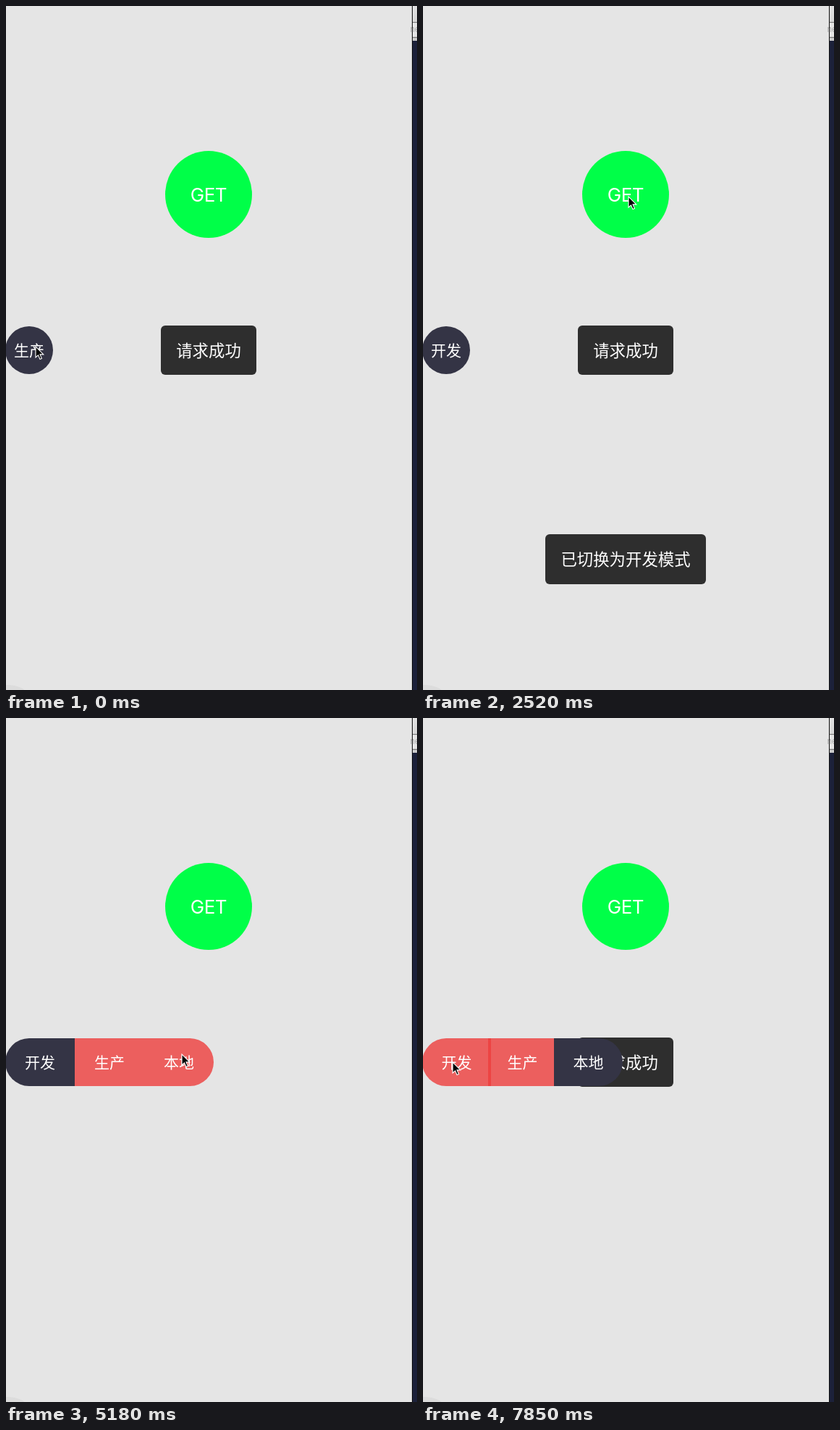
An HTML page for the animation above (8 s loop, 568x944 px).

```html
<!DOCTYPE html>
<html lang="zh-CN">
<head>
<meta charset="utf-8">
<title>环境切换</title>
<style>
  html, body { margin: 0; width: 100%; height: 100%; overflow: hidden; background: #e5e5e5; }
  svg { display: block; width: 568px; height: 944px; }
  text { fill: #fff; text-anchor: middle; font-family: "Noto Sans CJK SC", "Noto Sans CJK", sans-serif; font-weight: 350; }
  .get { font: 26px Inter, sans-serif; letter-spacing: -.5px; }
  .toast { font-size: 22.4px; }
  .toast rect { fill: #000; fill-opacity: .8; }
  .item { font-size: 21px; }
  .item rect { fill: #ee3e3c; fill-opacity: .8; }
  .item.on rect { fill: #343445; fill-opacity: 1; }
</style>
</head>
<body>
<svg viewBox="0 0 568 944">
  <defs>
    <clipPath id="clip"><rect id="pill" x="-1" y="442" height="66" rx="33"/></clipPath>
    <linearGradient id="bar" x2="0" y2="1">
      <stop stop-color="#e2e2e2"/><stop offset="1" stop-color="#cbcbcb"/>
    </linearGradient>
  </defs>
  <rect width="568" height="944" fill="#e5e5e5"/>
  <circle cx="3" cy="978" r="41" fill="#dcdcdc"/>

  <!-- window behind, at the right edge -->
  <rect x="562" width="6" height="944" fill="#1c213a"/>
  <rect x="562" width="6" height="48" fill="url(#bar)"/>
  <path d="M562 22.5h6M562 43.5h6" stroke="#777"/>
  <rect x="562" y="24" width="6" height="18" fill="#e6e6e6"/>
  <text x="565" y="36" style="font:11px Inter,sans-serif;fill:#aaa">ne</text>
  <rect x="561" width="1" height="944" fill="#111"/>

  <circle cx="280" cy="260" r="60" fill="#00ff48"/>
  <text class="get" x="280" y="269.5">GET</text>

  <g id="spin" fill="none" stroke="#ee3e3c" stroke-width="4.5"></g>
  <g id="done" class="toast">
    <rect x="214" y="441" width="132" height="68" rx="6"/>
    <text x="280" y="483.5">请求成功</text>
  </g>
  <g id="mode" class="toast">
    <rect x="169" y="729" width="222" height="69" rx="6"/>
    <text x="280" y="772"></text>
  </g>
  <g id="items" clip-path="url(#clip)"></g>
  <path id="cursor" d="M0 0V15L3.5 11.9 6 17.5 8.4 16.4 6 10.9H10.8Z" stroke="#fff" stroke-width="1.1"/>
</svg>
<script>
const LOOP = 8000, TICKS = 54, TICK = LOOP / TICKS;
const NAMES = ['开发', '生产', '本地'];
const $ = id => document.getElementById(id);

function add(parent, tag, attrs) {
  const el = document.createElementNS('http://www.w3.org/2000/svg', tag);
  set(el, attrs);
  return parent.appendChild(el);
}
function set(el, attrs) {
  for (const key in attrs) el.setAttribute(key, attrs[key]);
}

const ramp = (k, from, span) => Math.min(1, Math.max(0, (k - from) / span));
const smooth = x => x * x * (3 - 2 * x);
// Rises at one tick and falls at another.
const pulse = (k, on, off, span) => ramp(k, on, span) - ramp(k, off, span);

// All times in ticks.
const PICK_1 = 5.4, PICK_2 = 36.4, TOAST_LIFE = 14.6;

const menu = k => smooth(pulse(k, 1, PICK_1 + .36, 2) + pulse(k, 23, PICK_2 + .36, 2) + ramp(k, 51.27, 2));
const doneToast = k => 1 - ramp(k, PICK_1, 2) + pulse(k, 9.6, 28, 2) + ramp(k, 40.6, 2);
const modeToast = k => pulse(k, PICK_1, PICK_1 + TOAST_LIFE, 2) + pulse(k, PICK_2, PICK_2 + TOAST_LIFE, 2);
const loading = k => pulse(k, 9, 10.6, 1) + pulse(k, 13, 15.6, 1) + pulse(k, 40, 41.4, 1);

// Cursor trips: leave, arrive, x, y.
const TRIPS = [
  [5, 6, 44, 475], [7, 10, 280, 252], [13, 17, 284, 263], [19, 22, 18, 484],
  [23, 30, 240, 347], [30, 35, 243, 464], [37, 42, 272, 253], [44, 51, 41, 475]
];
function cursor(k) {
  return TRIPS.reduce(([x, y], [leave, arrive, toX, toY]) => {
    const f = smooth(ramp(k, leave, arrive - leave));
    return [x + (toX - x) * f, y + (toY - y) * f];
  }, [41, 470]);
}

// Ring with a fading tail; its head points to angle 0.
const SEGS = 24, R = 27.4;
for (let i = 0; i < SEGS; i++) {
  const point = n => {
    const a = (n - SEGS) / SEGS * 2 * Math.PI;
    return (R * Math.cos(a)).toFixed(2) + ' ' + (R * Math.sin(a)).toFixed(2);
  };
  add($('spin'), 'path', { d: `M${point(i)}A${R} ${R} 0 0 1 ${point(i + 1)}`, opacity: (i + 1) / SEGS });
}

const items = NAMES.map(name => {
  const g = add($('items'), 'g', { class: 'item' });
  const box = add(g, 'rect', { y: 442, height: 66 });
  const label = add(g, 'text', { y: 483 });
  label.textContent = name;
  return { g, box, label };
});

let chosen = -1;
function choose(n) {
  if (n === chosen) return;
  chosen = n;
  items.forEach((item, i) => item.g.classList.toggle('on', i === n));
  $('items').append(items[n].g);
  $('mode').lastElementChild.textContent = `已切换为${NAMES[n]}模式`;
}

function draw(k) {
  choose(k < PICK_1 ? 1 : k < PICK_2 ? 0 : 2);
  const open = menu(k);
  const step = Math.round(96 * open), width = Math.round(66 + 30 * open);
  set($('pill'), { width: 2 * step + width });
  items.forEach(({ g, box, label }, i) => {
    const x = -1 + step * i;
    set(box, { x, width });
    set(label, { x: x + width / 2 });
    g.style.display = step || i === chosen ? '' : 'none';
  });
  set($('done'), { opacity: doneToast(k) });
  set($('mode'), { opacity: modeToast(k) });
  set($('spin'), {
    opacity: loading(k),
    transform: `translate(280.5 475.5) rotate(${(k - 42) * 53 - 67})`
  });
  set($('cursor'), { transform: `translate(${cursor(k)})` });
}

// The screen advances in even ticks.
const start = performance.now();
function frame() {
  const t = Math.max(0, performance.now() - start) % LOOP;
  draw(Math.min(TICKS - 1, Math.floor((t + 10) / TICK)));
  requestAnimationFrame(frame);
}
frame();
</script>
</body>
</html>
```
